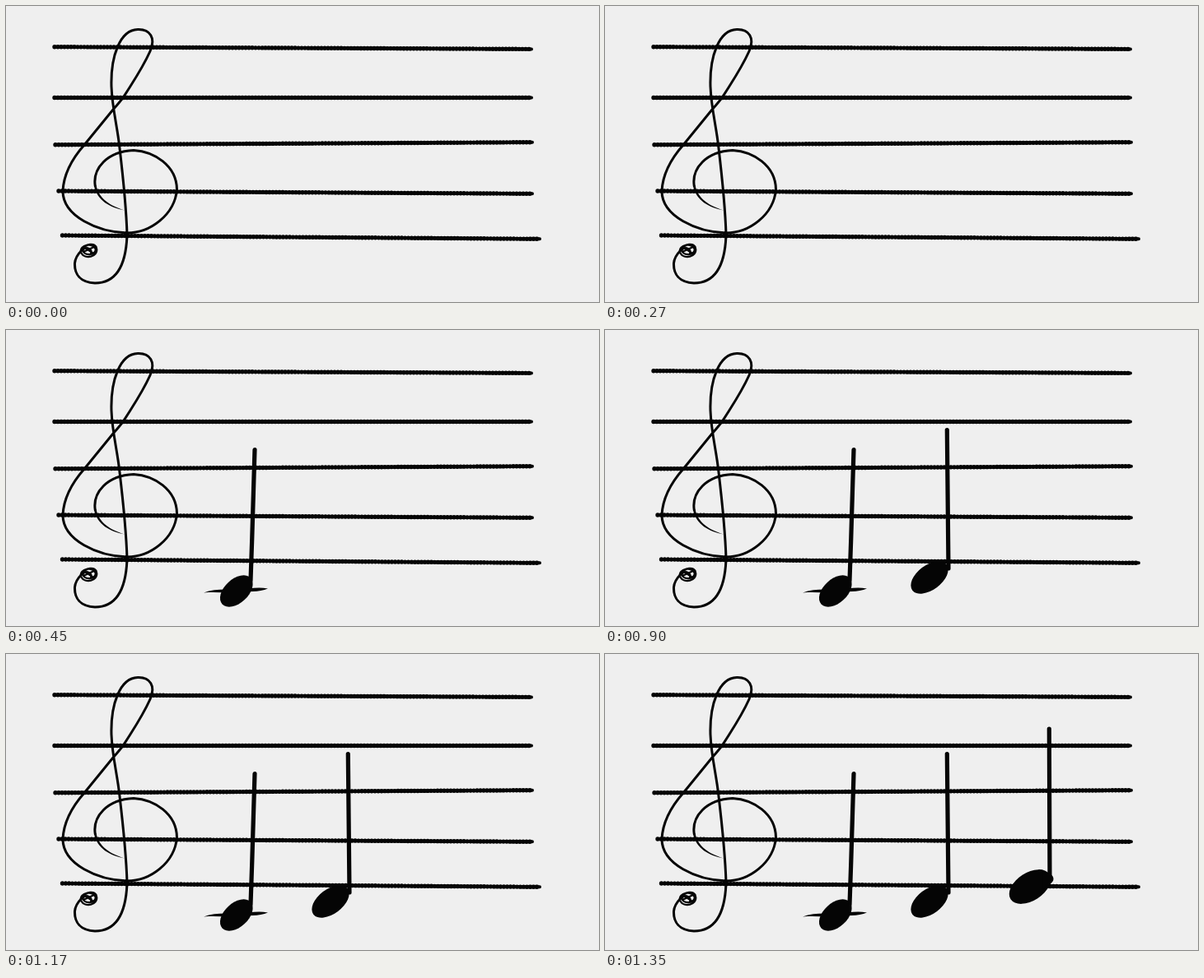
Animation of 720x360 px, one loop 1800 ms. Source, as an HTML page:

```html
<!DOCTYPE html>
<html lang="en">
<head>
<meta charset="utf-8">
<title>Notes on a staff</title>
<style>
  html, body { margin: 0; width: 100%; height: 100%; overflow: hidden; background: #efefef; }
  svg { display: block; width: 100%; height: 100%; }
  .stroke { fill: none; stroke: #050505; stroke-linecap: round; stroke-linejoin: round; }
  .staff { stroke-width: 4; }
  .beads { stroke-width: 5.4; stroke-dasharray: 0 4; }
  .clef { stroke-width: 3; }
  .curl { stroke-width: 2.4; }
  .stem { stroke-width: 5.2; }
  .ink { fill: #050505; }
  .note { animation: 1800ms step-end infinite; }
  .first { animation-name: first; }
  .second { animation-name: second; }
  .third { animation-name: third; }
  @keyframes first { 0% { opacity: 0; } 25%, 100% { opacity: 1; } }
  @keyframes second { 0% { opacity: 0; } 50%, 100% { opacity: 1; } }
  @keyframes third { 0% { opacity: 0; } 75%, 100% { opacity: 1; } }
</style>
</head>
<body>
<svg viewBox="0 0 720 360">
  <defs>
    <path id="lines" d="M59 49.7L638 52.4M59 111.5H638M60 168.8L639 165.7M64 225L639 228.3M68.500 279L648 283.3"/>
    <filter id="soft" filterUnits="userSpaceOnUse" x="0" y="0" width="720" height="360">
      <feGaussianBlur stdDeviation="0.45"/>
    </filter>
  </defs>
  <g filter="url(#soft)">
    <use href="#lines" class="stroke staff"/>
    <use href="#lines" class="stroke beads"/>

    <path class="ink" d="M144 248.500C126 245 111 237 107 219L109.500 218C113 235 127 243 144 248.500Z"/>
    <path class="stroke clef" d="M108.300 219C105 198 122 177 155 175.500
      C180 177 207 194 207.500 223C205 254 175 276 147 276
      C112 275 69 256 69 225C70 204 80 186 95 169
      L130 126C136 119 141 114 145 107C157 88 166 75 175 55C182 39 175 28 160 28.500
      C138 29 127 62 128 98C129 125 135 145 138 173
      C142 207 146 245 147 278C146 310 137 337 108 337
      C90 336 83 326 83.500 313C84 306 88 301 92 297"/>
    <path class="stroke curl" d="M92 297C96 289 109 287 110 295C112 305 96 309 91 300
      C89 290 106 287 109 296C108 304 95 304 93 297C98 291 106 297 103 301
      M95 293L106 301M94 299L107 293"/>

    <g class="note first">
      <path class="stroke stem" d="M302 145.500C301 180 299 250 297 305"/>
      <path class="ink" d="M240 319.500C252 315 266 315 280 316C294 315 305 312 318 314.500C307 319 293 318 280 319C266 320 253 318 240 319.500Z"/>
      <ellipse class="ink" cx="279.800" cy="317.500" rx="23.500" ry="14.500" transform="rotate(-43 279.800 317.500)"/>
    </g>
    <g class="note second">
      <path class="stroke stem" d="M415.300 121.500L417 290"/>
      <ellipse class="ink" cx="394" cy="301" rx="26" ry="15" transform="rotate(-37 394 301)"/>
    </g>
    <g class="note third">
      <path class="stroke stem" d="M539.300 91L540 275"/>
      <ellipse class="ink" cx="516" cy="283" rx="28" ry="17" transform="rotate(-33 516 283)"/>
      <path class="ink" d="M532 264Q547 268 544 276Q539 283 531 287Z"/>
    </g>
  </g>
</svg>
</body>
</html>
```
